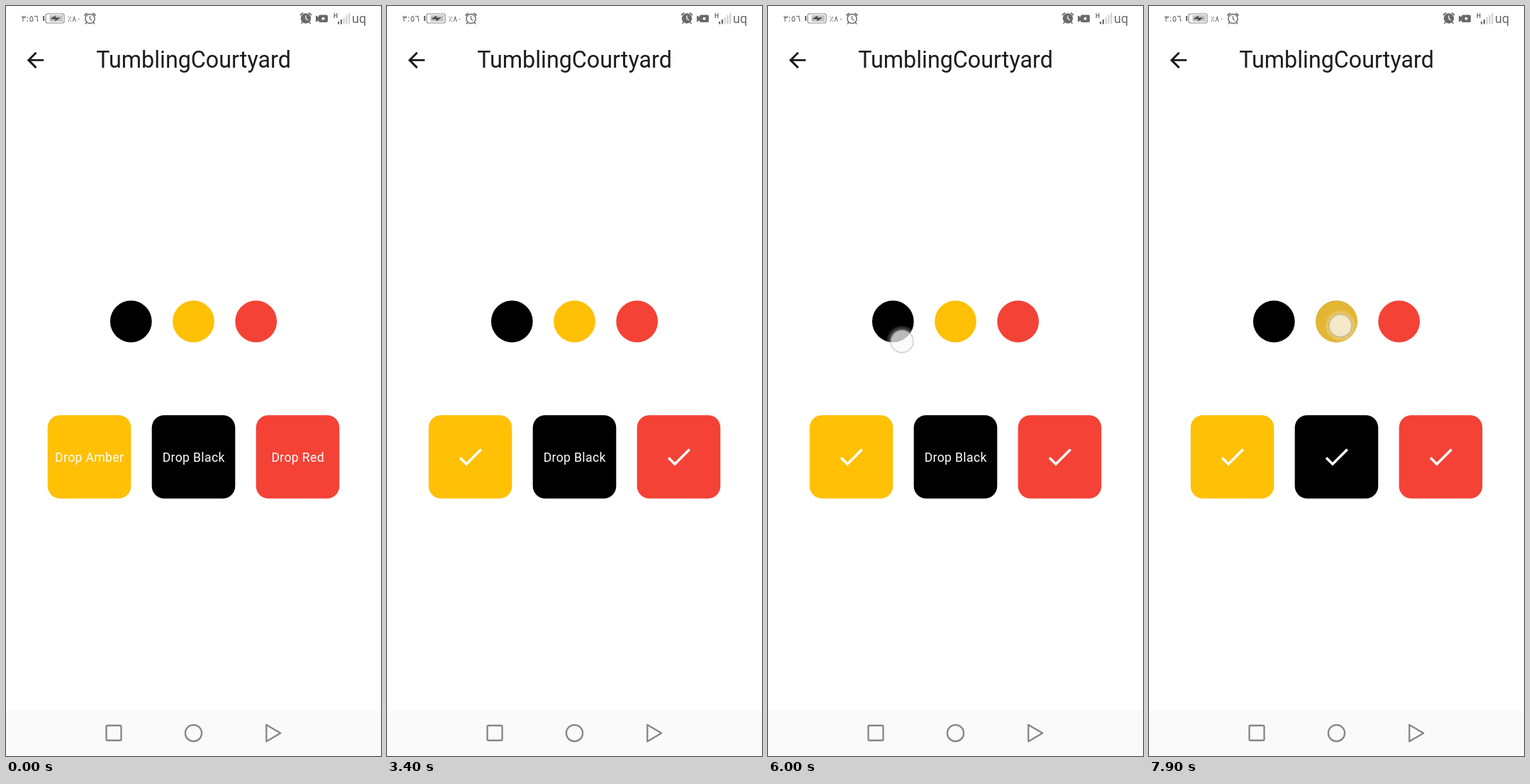
Animation, 529 px wide and 1058 px high, one loop 8 s. Source, as an HTML page with a canvas:

```html
<!DOCTYPE html>
<html lang="en">
<head>
<meta charset="utf-8">
<title>Drag and drop</title>
<style>
html, body { margin: 0; width: 100%; height: 100%; overflow: hidden; background: #fff; }
canvas { display: block; width: 100%; height: 100%; }
</style>
</head>
<body>
<canvas id="stage"></canvas>
<script>
const W = 529, H = 1058, MID = W / 2, LOOP = 8000, STEP = 100;
const canvas = document.getElementById('stage');
const ctx = canvas.getContext('2d');

const BLACK = '#000', AMBER = '#ffc006', RED = '#f44236', GREY = '#9e9e9e';
const INK = '#1d1b20', STATUS = '#6a6a6a', NAV = '#858585';
const BALL_Y = 445, BALL_R = 29.4, CARD_Y = 636, CARD = 117.6, GAP = 29.4;
const MOVE = 380, LAG = 100, FADE = 500;

const row = (items, pitch) => items.map((item, i) => ({ ...item, x: MID + (i - 1) * pitch }));
const balls = row([{ color: BLACK }, { color: AMBER }, { color: RED }], BALL_R * 2 + GAP);
const cards = row([
  { color: AMBER, label: 'Drop Amber' },
  { color: BLACK, label: 'Drop Black' },
  { color: RED, label: 'Drop Red' }
], CARD + GAP);

// A finger presses at "start", sweeps from a to b around "bend" at "go", and fades out by "end".
// With a ball it drags that ball onto a card; without one it misses.
const gestures = [
  { start: 1100, go: 1390, end: 1900, a: [360, 453], bend: [416, 540], b: [416, 650], ball: 2, card: 2 },
  { start: 2600, go: 2800, end: 3400, a: [264, 452], bend: [240, 590], b: [126, 640], ball: 1, card: 0 },
  { start: 3900, go: 3950, end: 4400, a: [188, 473], bend: [235, 570], b: [276, 634] },
  { start: 4700, go: 4700, end: 5700, a: [273, 630], bend: [190, 338], b: [95, 645], move: 800 },
  { start: 5900, go: 6000, end: 6700, a: [189, 473], bend: [235, 570], b: [290, 634] },
  { start: 6800, go: 6819, end: 7500, a: [165, 452], bend: [385, 660], b: [280, 660], ball: 0, card: 1 },
  { start: 7800, go: 8000, end: 8500, a: [270, 451], bend: [270, 451], b: [270, 451], ball: 1 }
];

function fingerAt(g, t) {
  const s = Math.min(1, Math.max(0, (t - g.go) / (g.move || MOVE)));
  const u = 1 - (1 - s) ** 3, v = 1 - u;
  return g.a.map((a, i) => v * v * a + 2 * u * v * g.bend[i] + u * u * g.b[i]);
}

// The ball keeps its grab offset and trails the finger.
function ballAt(g, t) {
  const [x, y] = fingerAt(g, t - LAG);
  return [x + balls[g.ball].x - g.a[0], y + BALL_Y - g.a[1]];
}

const isDrag = (g, t) => g.ball !== undefined && t >= g.start + STEP && t < g.end - STEP;
const isDone = (card, t) => gestures.some(g => g.card === card && t >= g.end - STEP);

function disc(x, y, r, fill) {
  ctx.beginPath();
  ctx.arc(x, y, r, 0, Math.PI * 2);
  ctx.fillStyle = fill;
  ctx.fill();
}

function stroke(color, width) {
  ctx.strokeStyle = color;
  ctx.lineWidth = width;
  ctx.stroke();
}

function ring(x, y, r, color, width) {
  ctx.beginPath();
  ctx.arc(x, y, r, 0, Math.PI * 2);
  stroke(color, width);
}

function box(x, y, w, h, r) {
  ctx.beginPath();
  ctx.roundRect(x, y, w, h, r);
}

function line(points, color, width) {
  ctx.beginPath();
  points.forEach(([x, y]) => ctx.lineTo(x, y));
  stroke(color, width);
}

function text(str, x, y, font, color, align = 'left', spacing = 0) {
  ctx.font = font;
  ctx.fillStyle = color;
  ctx.textAlign = align;
  ctx.letterSpacing = spacing + 'px';
  ctx.fillText(str, x, y);
}

// Icons live on a 24-unit grid centred on (x, y).
function icon(d, x, y, scale, color) {
  ctx.save();
  ctx.translate(x - 12 * scale, y - 12 * scale);
  ctx.scale(scale, scale);
  ctx.fillStyle = color;
  ctx.fill(new Path2D(d));
  ctx.restore();
}

const ARROW = 'M20 11H7.83l5.59-5.59L12 4l-8 8 8 8 1.41-1.41L7.83 13H20z';
const CHECK = 'M9 16.17L4.83 12l-1.42 1.41L9 19 21 7l-1.41-1.41z';

function alarm(x, y, filled) {
  if (filled) disc(x, y, 7.2, STATUS);
  else ring(x, y, 6.6, STATUS, 1.5);
  line([[x, y - 4], [x, y + .5], [x + 3, y + 2.5]], filled ? '#fff' : STATUS, 1.3);
  for (const s of [-1, 1]) {
    line([[x + s * 8, y - 4.5], [x + s * 4, y - 8]], STATUS, 1.7);
    line([[x + s * 4.5, y + 5], [x + s * 6.5, y + 7.5]], STATUS, 1.5);
  }
}

function battery() {
  ctx.fillStyle = STATUS;
  ctx.fillRect(52, 14, 2.2, 7);
  box(56, 11, 26, 13, 2.5);
  stroke('#8a8a8a', 1.2);
  ctx.fillStyle = '#c4c4c4';
  ctx.fillRect(61.5, 13, 18.5, 9);
  ctx.fillStyle = '#444';
  ctx.fill(new Path2D('M62 18.5L70 13.5L69.5 16.5L77 16.5L69 21.5L69.5 18.5Z'));
}

function camera() {
  ctx.fillStyle = STATUS;
  box(441, 12.5, 13, 10.5, 2);
  ctx.fill();
  ctx.fill(new Path2D('M437 13.5L442 16V20L437 22.5Z'));
  disc(447.5, 17.8, 2, '#fff');
}

function signal() {
  text('H', 462, 17, 'bold 8.5px Roboto, sans-serif', STATUS);
  for (let i = 0; i < 5; i++) {
    const h = 3.5 + i * 3;
    ctx.fillStyle = i < 2 ? STATUS : '#cfcfcf';
    ctx.fillRect(468 + i * 3.8, 25.5 - h, 2.2, h);
  }
}

function statusBar() {
  text('٣:٥٦', 21.5, 22, '12.6px "DejaVu Sans", sans-serif', STATUS);
  battery();
  text('٪٨٠', 86.5, 22, '12px "DejaVu Sans", sans-serif', STATUS);
  alarm(118.5, 18, false);
  alarm(423, 17.5, true);
  camera();
  signal();
  text('uq', 488, 24, '18px Roboto, sans-serif', STATUS);
}

function navBar() {
  ctx.fillStyle = '#fafafa';
  ctx.fillRect(0, 994, W, H - 994);
  box(141.5, 1015, 21, 21, 1.5);
  stroke(NAV, 2.3);
  ring(MID, 1025.7, 11.6, NAV, 2.3);
  ctx.lineJoin = 'round';
  ctx.beginPath();
  ctx.moveTo(367.3, 1013.9);
  ctx.lineTo(387.2, 1025.7);
  ctx.lineTo(367.3, 1037.5);
  ctx.closePath();
  stroke(NAV, 2.3);
  ctx.lineJoin = 'miter';
}

function drawCard(c, done) {
  box(c.x - CARD / 2, CARD_Y - CARD / 2, CARD, CARD, 17.6);
  ctx.fillStyle = c.color;
  ctx.fill();
  if (done) icon(CHECK, c.x, CARD_Y, 1.836, '#fff');
  else text(c.label, c.x + .2, 642.7, '17.6px Roboto, sans-serif', '#fff', 'center', .35);
}

function drawFinger(x, y) {
  const glow = ctx.createRadialGradient(x, y, 15, x, y, 23);
  glow.addColorStop(0, 'rgba(255,255,255,.4)');
  glow.addColorStop(1, 'rgba(255,255,255,0)');
  disc(x, y, 23, glow);
  disc(x, y, 15.5, 'rgba(248,248,248,.58)');
  ring(x, y, 16, 'rgba(150,145,165,.35)', 2);
}

function draw(t) {
  ctx.fillStyle = '#fff';
  ctx.fillRect(0, 0, W, H);
  statusBar();
  icon(ARROW, 41.5, 76.4, 1.469, INK);
  text('TumblingCourtyard', MID, 87, '32.3px Roboto, sans-serif', INK, 'center');
  navBar();

  const g = gestures.find(g => t >= g.start && t < g.end);
  const drag = g && isDrag(g, t);
  balls.forEach((b, i) => disc(b.x, BALL_Y, BALL_R, drag && g.ball === i ? GREY : b.color));
  cards.forEach((c, i) => drawCard(c, isDone(i, t)));
  if (!g) return;

  if (drag) {
    ctx.globalAlpha = .7;
    disc(...ballAt(g, t), BALL_R, balls[g.ball].color);
  }
  ctx.globalAlpha = Math.min(1, (g.end - t) / FADE);
  drawFinger(...fingerAt(g, t));
  ctx.globalAlpha = 1;
}

function resize() {
  const dpr = window.devicePixelRatio || 1;
  canvas.width = Math.round(innerWidth * dpr);
  canvas.height = Math.round(innerHeight * dpr);
  ctx.setTransform(canvas.width / W, 0, 0, canvas.height / H, 0, 0);
}

const start = performance.now();
function frame() {
  const t = (performance.now() - start) % LOOP;
  draw(Math.floor(t / STEP) * STEP);
  requestAnimationFrame(frame);
}

addEventListener('resize', resize);
resize();
frame();
</script>
</body>
</html>
```
